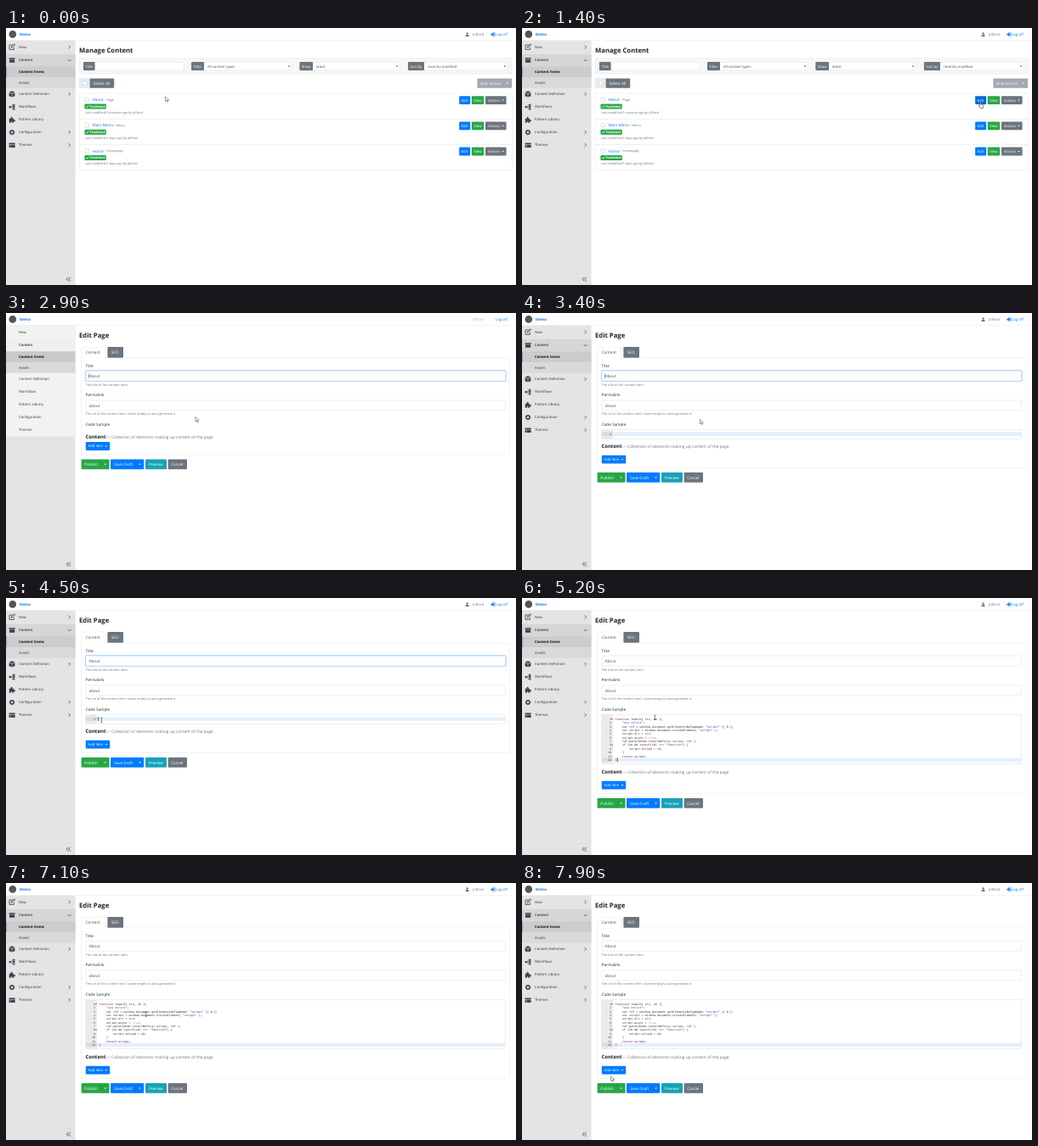
Animation of 600 by 303 pixels, one loop 8000 ms. Source, as an HTML page:

```html
<!DOCTYPE html>
<html lang="en">
<head>
<meta charset="utf-8">
<title>Content editor demo</title>
<style>
  html, body { margin: 0; height: 100%; overflow: hidden; background: #fff; }
  svg { display: block; width: 100vw; height: 100vh; }
  text { font-family: "Open Sans", "Noto Sans", sans-serif; text-rendering: geometricPrecision; white-space: pre; }
  .code text { font-family: "Liberation Mono", "DejaVu Sans Mono", monospace; }
  .side { fill: #e4e4e4; }
  .menu { fill: none; }
  .head { fill: #d6d6d6; }
  .active { fill: #cccccc; }
  .sub { fill: #d9d9d9; }
  .loading .menu { fill: #f1f3f3; }
  .loading .head { fill: #eef0f0; }
  .loading .active { fill: #c9c9c9; }
  .loading .icon { visibility: hidden; }
  .loading .user { opacity: .6; }
  .line { fill: none; stroke: #3c4248; stroke-width: .8; }
  .solid { fill: #3c4248; }
  .kw { fill: #7f0055; }
  .str { fill: #2a2a8c; }
  .lit { fill: #e08a62; }
</style>
</head>
<body>
<svg id="stage" viewBox="0 0 600 303" preserveAspectRatio="none"></svg>
<script>
const LOOP = 8000, STEP = 100;
const LOAD = 2400, ICONS = 3100, EDITOR = 3300, CLICK = 4500, PASTE = 5200;
const USER = 'jtilford';
const INK = '#212529', GRAY = '#6c757d', BLUE = '#007bff', GREEN = '#28a745', TEAL = '#17a2b8';
const stage = document.getElementById('stage');

// y is the middle of the capitals
const text = (x, y, s, size = 4.2, fill = INK, weight = 400, more = '') =>
  `<text x="${x}" y="${y + size * .35}" font-size="${size}" fill="${fill}" font-weight="${weight}" ${more}>${s}</text>`;
const rect = (x, y, w, h, fill, more = '') =>
  `<rect x="${x}" y="${y}" width="${w}" height="${h}" fill="${fill}" ${more}/>`;
const box = (x, y, w, h, fill = '#fff', edge = '#ced4da', r = 1, more = '') =>
  rect(x, y, w, h, fill, `stroke="${edge}" stroke-width=".4" rx="${r}" ${more}`);
const path = (d, more = 'class="line"') => `<path d="${d}" ${more}/>`;
const caretDown = (x, y, fill = '#fff') => path(`M${x - 1.3} ${y - .6}h2.6l-1.3 1.5z`, `fill="${fill}"`);
const button = (x, y, w, h, fill, label, pad = 3.3, size = 4.65, id = '') =>
  rect(x, y, w, h, fill, `rx="1" ${id && `id="${id}"`}`) + text(x + pad, y + h / 2, label, size, '#fff', 500);
const group = (id, body, more = '') => `<g id="${id}" ${more}>${body}</g>`;

function topBar() {
  return rect(0, 0, 600, 14.4, '#fff') + rect(0, 14.3, 600, .4, '#e6e6e6') +
    '<circle cx="7.8" cy="7.4" r="4.3" fill="#4d5a4f"/>' +
    text(16, 7.6, 'Demo', 4.4, BLUE, 700) +
    `<g class="icon"><circle cx="542.6" cy="6.4" r="1.2" fill="${GRAY}"/>` +
    path('M540.4 10q0-2.3 2.2-2.3t2.2 2.3z', `fill="${GRAY}"`) +
    path('M570.4 6.7h1.8v-1.6l2.4 2.5-2.4 2.5v-1.6h-1.8z', `fill="${BLUE}"`) +
    path('M573.4 5.4h1.6v4.4h-1.6', `fill="none" stroke="${BLUE}" stroke-width=".6"`) + '</g>' +
    text(562, 7.6, USER, 4.2, '#6f757a', 400, 'class="user" text-anchor="end"') +
    text(576, 7.6, 'Log off', 4.3, BLUE);
}

function sidebar() {
  const items = [[22.5, 'New', 1], [38, 'Content', 0], [78, 'Content Definition', 1], [93, 'Workflows'],
    [108, 'Pattern Library'], [123, 'Configuration', 1], [138, 'Themes', 1]];
  const icons = [
    path('M8.5 20H4v5.4h5.4v-2.4M6.2 23.3l.4-1.4 3.2-3.2 1 1-3.2 3.2z'),
    path('M3.6 35.2h7v1.6h-7zM4 37.3h6.2v3.4H4z', 'class="solid"'),
    path('M7 74.3l3.3 1.3L7 76.9l-3.3-1.3zM3.6 76.3l3.1 1.2v4l-3.1-1.3zM10.4 76.3l-3.1 1.2v4l3.1-1.3z', 'class="solid"'),
    path('M3.6 92h2.2v2.2H3.6zM8.2 89.8h2.2v2H8.2zM8.2 92.1h2.2v2H8.2zM8.2 94.4h2.2v2H8.2z', 'class="solid"') +
      path('M5.8 93.1h2.4M8.2 90.8H7v4.6h1.2', 'fill="none" stroke="#3c4248" stroke-width=".5"'),
    path('M3.8 106.8h1.9q-.6-2 .9-2t.9 2h1.7v1.7q1.8-.7 1.8 .8t-1.8 .8v1.6h-2q.4-1.4-.6-1.4t-.6 1.4H3.8z', 'class="solid"'),
    '<circle cx="7" cy="123" r="2" fill="none" stroke="#3c4248" stroke-width="1.5"/>' +
      '<circle cx="7" cy="123" r="2.9" fill="none" stroke="#3c4248" stroke-width=".8" stroke-dasharray="1.14"/>',
    path('M3.6 135.4h7v1.7h-7zM3.6 137.5h1.9v3.4H3.6zM5.9 137.5h4.7v3.4H5.9z', 'class="solid"')
  ];
  return '<rect class="side" y="14.6" width="81.6" height="289"/>' +
    '<rect class="menu" y="14.6" width="81.6" height="131"/>' +
    '<rect class="head" y="30.8" width="81.6" height="14.4"/>' +
    '<rect class="active" y="45.2" width="81.6" height="12.9"/>' +
    '<rect class="sub" y="58.1" width="81.6" height="12.6"/>' +
    rect(0, 45.2, .5, 12.9, '#2f7fc8', 'class="icon"') +
    rect(0, 289.4, 81.6, .4, '#d6d6d6') +
    items.map(([y, s]) => text(15, y, s, 4.2, '#333', s === 'Content' ? 600 : 400)).join('') +
    text(15, 51.5, 'Content Items', 4.2, '#111', 700) + text(15, 64.5, 'Assets', 4.2, '#333') +
    '<g class="icon">' + icons.join('') +
    items.filter(i => i[2] !== undefined).map(([y, , right]) =>
      path(right ? `M73.7 ${y - 1.9}l1.9 1.9-1.9 1.9` : `M72.7 ${y - .9}l1.9 1.9 1.9-1.9`)).join('') + '</g>' +
    path('M73.3 293.8l-2.1 2.4 2.1 2.4M75.9 293.8l-2.1 2.4 2.1 2.4');
}

function listPage() {
  const field = (x, split, end, label, value) =>
    box(x, 40.3, end - x, 9.6) + rect(x, 40.1, split - x, 10, GRAY, 'rx="1"') +
    text(x + 2.6, 45.1, label, 4.2, '#fff') +
    (value ? text(split + 4, 45.1, value, 4.2, '#495057') + caretDown(end - 3, 45.1, '#444') : '');
  const row = ([title, kind, ago, kindX], i) => {
    const y = 77 + i * 30.2;
    return box(86.2, y, 509, 30.2, '#fff', '#dfdfdf', 0) +
      box(93, y + 5.2, 4.6, 4.6, '#fff', '#adb5bd', .8) +
      text(101.6, y + 7.6, title, 4.65, BLUE) + text(kindX, y + 7.7, '• ' + kind, 3.7, GRAY) +
      rect(92.4, y + 12.5, 25.4, 6, GREEN, 'rx="1"') +
      path(`M94 ${y + 15.5}l1.2 1.3 2.3-2.6`, 'fill="none" stroke="#fff" stroke-width=".8"') +
      text(98.8, y + 15.5, 'Published', 3.6, '#fff', 700) +
      text(93, y + 22.7, `Last modified ${ago} ago by ${USER}`, 3.8, GRAY) +
      button(533.2, y + 3.2, 13, 9.8, BLUE, 'Edit', 2.5, 4.3, i ? '' : 'editBtn') +
      button(547.8, y + 3.2, 14.4, 9.8, GREEN, 'View', 2.5, 4.3) +
      button(564, y + 3.2, 24.6, 9.8, GRAY, 'Actions', 2.9, 4.2) + caretDown(584.5, y + 8.1);
  };
  return text(86, 26.8, 'Manage Content', 7.7, INK, 700) +
    box(86.2, 35.8, 509, 18, '#f7f7f7', '#dfdfdf') +
    field(91, 104.6, 209, 'Title') + field(218, 233, 336, 'Filter', 'All content types') +
    field(345.4, 361, 463, 'Show', 'latest') + field(473, 492, 590, 'Sort by', 'recently modified') +
    box(86.2, 59.6, 14, 11, '#e9ecef') + box(90.3, 63, 4.4, 4.4, '#fff', '#adb5bd', .8) +
    button(98.6, 59.4, 28.6, 11.4, GRAY, 'Select All', 4, 4.8) +
    button(554.4, 59.4, 40.8, 11.4, '#a4a9ae', 'Bulk Actions', 3.8, 4.4) + caretDown(589.6, 65.1) +
    [['About', 'Page', '5 minutes', 116.4], ['Main Menu', 'Menu', '5 days', 127.4], ['Home', 'Homepage', '5 days', 116.4]].map(row).join('');
}

const CODE = [
  [0, 'function loadJS( src, cb ){'],
  [4, '"use strict";'],
  [4, 'var ref = window.document.getElementsByTagName( "script" )[ 0 ];'],
  [4, 'var script = window.document.createElement( "script" );'],
  [4, 'script.src = src;'],
  [4, 'script.async = true;'],
  [4, 'ref.parentNode.insertBefore( script, ref );'],
  [4, 'if (cb && typeof(cb) === "function") {'],
  [8, 'script.onload = cb;'],
  [4, '}'],
  [4, 'return script;'],
  [0, '}']
];
const PITCH = 4.38, CHAR = 2.05, CODE_X = 109.8;
const lineY = i => 142.6 + i * PITCH;
const tint = s => s.replace(/("[^"]*")|\b(function|var|if|typeof|return)\b|\b(true)\b|&/g, (m, str, kw) =>
  m === '&' ? '&amp;' : `<tspan class="${str ? 'str' : kw ? 'kw' : 'lit'}">${m}</tspan>`);

function editPage() {
  const mono = CHAR / .6;
  const number = i => text(105, lineY(i), i + 1, mono, '#444', 400, 'text-anchor="end"');
  return text(86, 26.8, 'Edit Page', 7.7, INK, 700) +
    box(88.8, 53, 504, 100, '#fff', '#dee2e6', 0, 'id="panel"') +
    path('M88.8 53.4V41.4q0-1.2 1.2-1.2h25.6q1.2 0 1.2 1.2v12', 'fill="#fff" stroke="#dee2e6" stroke-width=".4"') +
    text(93.6, 46.8, 'Content', 4.65, '#495057') +
    button(119.4, 40, 18.6, 12.8, GRAY, 'SEO', 4.4) +
    text(93.6, 62, 'Title', 4.65) + box(93.8, 68.2, 494, 12) +
    group('focus', rect(93.3, 67.7, 495, 13, 'none', 'rx="1.4" stroke="#007bff" stroke-opacity=".25" stroke-width="1"') +
      box(93.8, 68.2, 494, 12, '#fff', '#80bdff')) +
    text(97.6, 74.4, 'About', 4.65, '#495057') +
    rect(97, 71.4, .4, 5.8, '#222', 'id="titleCaret"') +
    text(93.6, 84.5, 'The title of the content item.', 3.8, GRAY) +
    text(93.6, 96.6, 'Permalink', 4.65) + box(93.8, 102.9, 494, 12) +
    text(97.6, 109.1, 'about', 4.65, '#495057') +
    text(93.6, 118.9, 'The url of the content item. Leave empty to auto-generate it.', 3.8, GRAY) +
    text(93.6, 131, 'Code Sample', 4.65) +
    group('editor',
      box(93.8, 137.2, 494, 11, '#fff', '#ced4da', 0, 'id="frame"') +
      rect(94, 137.4, 13, 10, '#ebebeb', 'id="gutter"') +
      rect(94, 140.4, 13, PITCH, '#dadada', 'class="now"') +
      rect(107, 140.4, 480.6, PITCH, '#e4effa', 'class="now"') + number(0) +
      group('source', CODE.map(([pad, s], i) =>
        (i ? number(i) : '') + text(CODE_X + pad * CHAR, lineY(i), tint(s), mono, '#222')).join('') +
        caretDown(106.2, lineY(0), '#777') + caretDown(106.2, lineY(7), '#777')) +
      rect(0, 0, .6, 4.8, '#000', 'id="codeCaret"'), 'class="code"') +
    group('heading', text(93.4, 0, 'Content', 6, INK, 700) +
      text(118, .2, '— Collection of elements making up content of the page.', 4.8, GRAY)) +
    group('tail',
      button(93.8, -5.2, 28.4, 9.8, BLUE, 'Add Item', 2.8, 4.2) + caretDown(118, -.2) +
      button(88.6, 15.1, 33, 11.8, GREEN, 'Publish', 3.6) + caretDown(116.8, 21.1) + rect(111.8, 15.1, .3, 11.8, '#1f9a3d') +
      button(123, 15.1, 39.2, 11.8, BLUE, 'Save Draft', 4) + caretDown(157.6, 21.1) + rect(152.6, 15.1, .3, 11.8, '#006fe6') +
      button(164, 15.1, 25, 11.8, TEAL, 'Preview', 4) +
      button(190.6, 15.1, 22.4, 11.8, GRAY, 'Cancel', 3.6));
}

const pointers = {
  arrow: path('M0 0V5.6L1.4 4.4 2.3 6.4 3.2 6 2.3 4.1H4.1z', 'fill="#fff" stroke="#222" stroke-width=".45"'),
  hand: path('M-.6 0q.6-.8 1.2 0v2.4l2.2.5q.6.2.5.9l-.5 3.2h-3L-2 4.2q0-.8.7-.6l.7.6z', 'fill="#fff" stroke="#111" stroke-width=".5"'),
  beam: path('M-1.1-2.6H1.1M0-2.6V2.6M-1.1 2.6H1.1', 'stroke="#222" stroke-width=".5"')
};

stage.innerHTML = rect(0, 0, 600, 303, '#fff') + topBar() + sidebar() +
  group('list', listPage()) + group('edit', editPage()) +
  group('pointer', Object.entries(pointers).map(([k, d]) => group(k, d)).join(''));

const $ = id => document.getElementById(id);
const show = (id, on) => { $(id).style.display = on ? '' : 'none'; };
const set = (el, attrs) => { for (const k in attrs) el.setAttribute(k, attrs[k]); };

// time, x, y of the pointer
const TRACK = [[0, 187.5, 80.8], [500, 187.5, 80.8], [900, 420, 92], [1300, 539.5, 87.5], [1800, 539.5, 87.5],
  [1900, 477, 104.5], [2000, 477, 104.5], [2100, 447, 104.5], [2200, 430, 105], [2300, 430, 105], [2600, 223, 122.5],
  [3300, 223, 122.5], [4100, 112.3, 144], [4700, 112.3, 144], [5000, 156.3, 140.8], [5900, 156.3, 140.8],
  [6100, 190, 127], [6300, 199.6, 122.2], [6500, 236, 126], [6700, 225, 132], [6900, 172, 147],
  [7500, 150, 170], [7800, 117, 203], [7900, 104.6, 227.6], [8000, 104.6, 227.6]];

function pointerAt(t) {
  const i = TRACK.findIndex(k => k[0] > t), a = TRACK[i - 1], b = TRACK[i];
  const p = (t - a[0]) / (b[0] - a[0]);
  return [a[1] + (b[1] - a[1]) * p, a[2] + (b[2] - a[2]) * p];
}

function pointerKind(t, x, y) {
  if (t < LOAD) return x > 533 && x < 546 ? 'hand' : 'arrow';
  const bottom = t >= PASTE ? 196 : 148;
  return t >= EDITOR && x > 107 && y > 137 && y < bottom ? 'beam' : 'arrow';
}

function draw(t) {
  const [x, y] = pointerAt(t), kind = pointerKind(t, x, y);
  set($('pointer'), { transform: `translate(${x} ${y})` });
  for (const k in pointers) show(k, k === kind);
  set($('editBtn'), { fill: kind === 'hand' ? '#0069d9' : BLUE });

  const editing = t >= LOAD, ready = t >= EDITOR, pasted = t >= PASTE;
  show('list', !editing);
  show('edit', editing);
  stage.classList.toggle('loading', editing && t < ICONS);

  const rows = pasted ? CODE.length : 1, last = rows - 1;
  const tailY = pasted ? 220.9 : ready ? 172.9 : 157.3;
  const codeH = rows * PITCH - (pasted ? .8 : 0);
  show('editor', ready);
  show('source', pasted);
  set($('frame'), { height: codeH + 6.6 });
  set($('gutter'), { height: codeH + 6.2 });
  document.querySelectorAll('.now').forEach(el => set(el, { y: 140.4 + last * PITCH }));
  set($('heading'), { transform: `translate(0 ${pasted ? 205 : ready ? 157 : 146.2})` });
  set($('tail'), { transform: `translate(0 ${tailY})` });
  set($('panel'), { height: tailY + 9.6 - 53 });

  $('focus').style.opacity = t <= CLICK ? 1 : Math.max(0, 1 - (t - CLICK) / 200);
  show('titleCaret', t < CLICK && (t - LOAD) % 1000 <= 500);
  set($('codeCaret'), { x: pasted ? 111.9 : 108, y: lineY(last) - 2.4 });
  show('codeCaret', t >= CLICK && (t - (pasted ? PASTE : CLICK)) % 1000 < 500);
}

const start = performance.now();
(function tick() {
  const t = Math.max(0, performance.now() - start) % LOOP;
  draw(Math.floor(t / STEP) * STEP);
  requestAnimationFrame(tick);
})();
</script>
</body>
</html>
```
